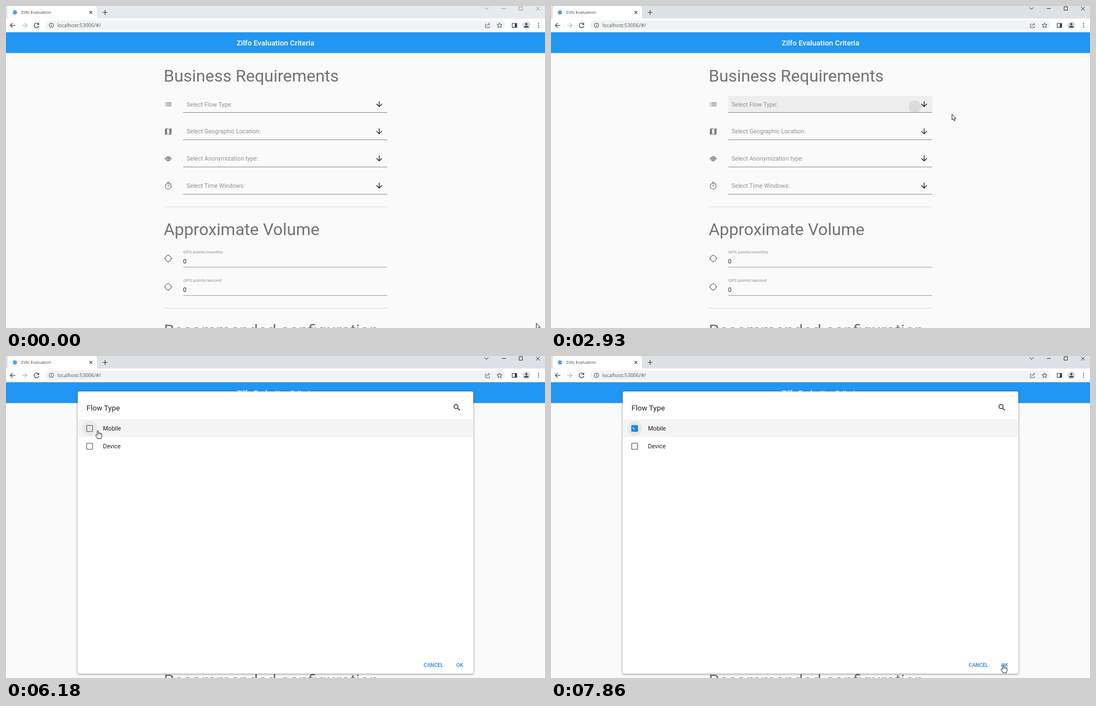
Write an HTML page that moves like this. It is 967x579 px and loops after 7.99 s.

```html
<!DOCTYPE html>
<html lang="en">
<head>
<meta charset="utf-8">
<title>Zilfo Evaluation</title>
<style>
  html, body { margin: 0; width: 100%; height: 100%; overflow: hidden; background: #fafafa; }
  svg { display: block; }
  text { font-family: Roboto, sans-serif; white-space: pre; }
  .ui { font-family: "Open Sans", "Noto Sans", sans-serif; }
  #dialog > .sheet { filter: drop-shadow(0 1px 2px rgba(0, 0, 0, .42)); }
</style>
</head>
<body>
<svg id="stage" width="967" height="579" viewBox="0 0 967 579"></svg>
<script>
const LOOP = 7990;

const ICONS = {
  down: '<path d="M20 12l-1.41-1.41L13 16.17V4h-2v12.17l-5.58-5.59L4 12l8 8 8-8z"/>',
  list: '<path d="M3 13h2v-2H3zm0 4h2v-2H3zm0-8h2V7H3zm4 4h14v-2H7zm0 4h14v-2H7zM7 7v2h14V7z"/>',
  map: '<path d="M20.5 3l-.16.03L15 5.1 9 3 3.36 4.9c-.21.07-.36.25-.36.48V20.5c0 .28.22.5.5.5l.16-.03L9 18.9l6 2.1 5.64-1.9c.21-.07.36-.25.36-.48V3.5c0-.28-.22-.5-.5-.5zM15 19l-6-2.11V5l6 2.11z"/>',
  mask: '<path d="M1.5 11h4v2h-4zm17 0h4v2h-4z"/><circle cx="12" cy="12" r="7"/><path d="M8.6 15.5v-5h1v-1a2.4 2.4 0 0 1 4.8 0v1h1v5z" fill="none" stroke="#fafafa" stroke-width="1.2"/>',
  timer: '<path d="M9 1h6v2H9zm2 7h2v6h-2zm6.6-1.9l1.5-1.5 1.4 1.4-1.5 1.5z"/><circle cx="12" cy="13" r="8" fill="none" stroke="currentColor" stroke-width="2"/>',
  target: '<path d="M11 1h2v3h-2zm0 19h2v3h-2zM1 11h3v2H1zm19 0h3v2h-3z"/><circle cx="12" cy="12" r="8" fill="none" stroke="currentColor" stroke-width="2"/>',
  search: '<path d="M15.5 14h-.79l-.28-.27A6.47 6.47 0 0 0 16 9.5 6.5 6.5 0 1 0 9.5 16c1.61 0 3.09-.59 4.23-1.57l.27.28v.79l5 4.99L20.49 19zm-6 0a4.5 4.5 0 1 1 0-9 4.5 4.5 0 0 1 0 9z"/>'
};

const icon = (name, cx, cy, color) =>
  `<g transform="translate(${cx - 8} ${cy - 8}) scale(.6667)" fill="${color}" color="${color}">${ICONS[name]}</g>`;
const text = (x, y, size, color, str, extra = '') =>
  `<text x="${x}" y="${y}" font-size="${size}" fill="${color}" ${extra}>${str}</text>`;
const rect = (x, y, w, h, fill, extra = '') =>
  `<rect x="${x}" y="${y}" width="${w}" height="${h}" fill="${fill}" ${extra}/>`;
const line = (d, color, width = 1.2, extra = '') =>
  `<path d="${d}" fill="none" stroke="${color}" stroke-width="${width}" ${extra}/>`;

const GREY = '#737373', HINT = '#929292', INK = '#212121', BLUE = '#2196f3', LINK = '#1e88e5', DARK = '#4a4d51';

function browser() {
  return rect(0, 0, 967, 24, '#dee1e6', 'id="strip"') +
    '<path d="M0 23Q3 23 3 19V5Q3 0 8 0H158Q163 0 163 5V19Q163 23 167 23Z" fill="#fff"/>' +
    rect(0, 22.5, 967, 24.7, '#fff') +
    '<circle cx="16" cy="11.5" r="3.8" fill="#42a5f5"/>' +
    text(27, 14.2, 7.6, '#45494d', 'Zilfo Evaluation', 'class="ui"') +
    line('M149.8 9L154.6 13.8M154.6 9L149.8 13.8', '#3c4043', 1.1) +
    line('M173.5 11.5H182M177.7 7.3V15.7', '#3c4043', 1.2) +
    '<g id="buttons">' +
      line('M858.5 2.5L862 6L865.5 2.5', 'currentColor', 1) +
      line('M889.5 4.5H896.5', 'currentColor', 1) +
      line('M920.5 1.5H926.5V7.5H920.5Z', 'currentColor', 1) +
      line('M951 1.5L957.5 8M957.5 1.5L951 8', 'currentColor', 1) +
    '</g>' +
    line('M16.5 34.8H8M12 30.6L7.8 34.8L12 39', DARK, 1.3) +
    line('M29 34.8H37.5M33.5 30.6L37.7 34.8L33.5 39', '#b4b7ba', 1.2) +
    line('M58.3 32.3A4.3 4.3 0 1 0 59 36', DARK, 1.3) +
    '<path d="M59.4 29.8V34H55.2Z" fill="#4a4d51"/>' +
    rect(70.5, 26, 825, 17.5, '#f1f3f4', 'rx="8.75"') +
    `<circle cx="81.5" cy="34.8" r="4" fill="none" stroke="${DARK}"/>` +
    line('M81.5 34.2V37M81.5 32.3V33.3', DARK, 1.1) +
    text(92, 38, 9, '#55595d', 'localhost:53006/#/', 'class="ui"') +
    line('M862 32.5H860V39H867.5V36.5M862.5 36.5Q863 32.8 867 32.6M865.3 30.2L868 32.6L865.3 35', '#5f6368', 1) +
    '<path d="M885.5 30.2L886.8 33.4L890.1 33.6L887.6 35.8L888.4 39L885.5 37.2L882.6 39L883.4 35.8L880.9 33.6L884.2 33.4Z" fill="none" stroke="#4a4d51"/>' +
    line('M908.2 31.2H916.2V38.4H908.2Z', '#3c4043', 1.1) + rect(912.8, 31, 3.6, 7.6, '#3c4043') +
    '<circle cx="933.5" cy="34.8" r="7" fill="#d8dbe0"/><circle cx="933.5" cy="32.6" r="2" fill="#45494e"/>' +
    '<path d="M929.3 38.8Q929.3 35.6 933.5 35.6T937.7 38.8Z" fill="#45494e"/>' +
    [31.3, 34.8, 38.3].map(y => `<circle cx="955.5" cy="${y}" r="1" fill="#4a4d51"/>`).join('') +
    rect(0, 47.2, 967, 37.4, BLUE) +
    text(483.5, 71.4, 13.33, '#fff', 'Zilfo Evaluation Criteria', 'text-anchor="middle" font-weight="500"');
}

function form() {
  const picks = [['list', 'Flow Type'], ['map', 'Geographic Location'], ['mask', 'Anonymization type'], ['timer', 'Time Windows']];
  const counts = ['monthly', 'second'];
  const heading = (y, str) => text(283, y, 30, GREY, str);
  return heading(135.8, 'Business Requirements') +
    '<g id="hover">' + rect(318, 161.5, 366, 30, '#eee', 'rx="2"') + '</g>' +
    '<circle id="ripple" cx="652.8" cy="181" fill="#000" fill-opacity=".075"/>' +
    picks.map(([name, label], i) => {
      const y = 176.5 + i * 48.85;
      return icon(name, 291, y + .4, '#808080') +
        text(324, y + 4, 10.67, HINT, `Select ${label}:`) +
        icon('down', 669.5, y, '#222') +
        rect(318, Math.round(y + 14.5), 366, 1, '#8c8c8c');
    }).join('') +
    rect(283, 360.6, 401, 1, '#dfdfdf') +
    heading(412.3, 'Approximate Volume') +
    counts.map((unit, i) => {
      const y = 445 + i * 51;
      return icon('target', 291, y + 9, '#808080') +
        text(318, y - .2, 8, HINT, `GPS points/${unit}`) +
        text(317.7, y + 18, 10.67, INK, '0') +
        rect(318, y + 24, 366, 1, '#a2a2a2');
    }).join('') +
    rect(283, 543, 401, 1, '#dfdfdf') +
    heading(593.7, 'Recommended configuration');
}

function dialog() {
  const box = (y, id) => `<rect ${id} x="144.7" y="${y}" width="10.7" height="10.7" rx=".7" fill="none" stroke="#707070" stroke-width="1.33"/>`;
  return '<g id="dialog">' +
    rect(128.7, 63.7, 709.6, 507.3, '#fff', 'rx="2.7" class="sheet"') +
    text(144.6, 98, 13.33, INK, 'Flow Type') +
    icon('search', 809, 92.6, '#222') +
    rect(128.7, 114, 709.6, 32, '#f4f4f4', 'id="row"') +
    '<circle id="halo" cx="150" cy="130.2" r="13.3" fill="#000" fill-opacity=".045"/>' +
    box(124.9, 'id="check"') +
    line('M146.6 128.4L149.6 131.8', '#fff', 1.3, 'id="tick"') +
    text(174, 134.2, 10.67, INK, 'Mobile') +
    box(156.9, '') +
    text(174, 166.2, 10.67, INK, 'Device') +
    text(749.3, 559.4, 9.33, LINK, 'CANCEL', 'font-weight="500"') +
    text(807.7, 559.4, 9.33, LINK, 'OK', 'font-weight="500"') +
    '</g>';
}

const cursor = `<g id="cursor" stroke="#111" stroke-width=".9" stroke-linejoin="round" fill="#fff">
  <path id="arrow" d="M.4.4V10.9L2.7 8.8L4.3 12.5L6 11.8L4.4 8.1H7.6Z"/>
  <g id="hand">
    <path d="M-1.2 1.2C-1.2-.2 1.1-.2 1.1 1.2V5C1.3 4 3.1 4.1 3.2 5.3C3.5 4.4 5.1 4.7 5.2 5.9C5.5 5.2 7 5.4 7 6.8V9.8C7 12 5.8 12.6 5.8 14.7H-.8C-.8 12.8-4.3 9.6-4.3 8.4C-4.1 7.2-2.6 7.4-1.2 9Z"/>
    <path d="M1.1 5V7.6M3.2 5.3V7.8M5.2 5.9V8" fill="none" stroke-width=".6"/>
  </g></g>`;

document.getElementById('stage').innerHTML = rect(0, 0, 967, 579, '#fafafa') + form() + browser() + dialog() + cursor;
const el = id => document.getElementById(id);
const show = (id, on) => el(id).style.display = on ? '' : 'none';

// Pointer moves: first step, last step, step count, destination x and y
const START = [951, 570];
const MOVES = [
  [70, 670, 10, 653, 178],
  [1010, 1010, 1, 654, 181.3],
  [2000, 2340, 5, 719, 194],
  [5590, 5590, 1, 623, 188],
  [5660, 5980, 6, 168.5, 135],
  [6180, 6380, 4, 151, 129.8],
  [6780, 6980, 4, 183.3, 153.7],
  [7120, 7720, 10, 811.3, 555]
];
const ease = p => p * p * (3 - 2 * p) * .5 + p * .5;

function pointer(t) {
  let [x, y] = START;
  for (const [from, to, n, tx, ty] of MOVES) {
    if (t < from) break;
    const gap = n > 1 ? (to - from) / (n - 1) : 1;
    const step = Math.min(n, Math.floor((t - from) / gap + 1.001));
    const p = ease(step / n);
    x += (tx - x) * p;
    y += (ty - y) * p;
  }
  return [x, y];
}

function overLink(x, y, open) {
  if (open) return (x > 129 && x < 838 && y > 114 && y < 178) || (x > 800 && y > 545 && y < 568);
  return x > 318 && x < 684 && y > 162 && y < 191;
}

function draw(t) {
  const open = t >= 4060, active = t >= 880, checked = t >= 7860;
  const [x, y] = pointer(t);
  const hand = overLink(x, y, open);
  el('cursor').setAttribute('transform', `translate(${x.toFixed(1)} ${y.toFixed(1)})`);
  show('hand', hand);
  show('arrow', !hand);

  el('strip').setAttribute('fill', active ? '#dee1e6' : '#e7eaed');
  el('buttons').style.color = active ? '#333' : '#999';
  show('hover', active);
  show('ripple', t >= 1940);
  el('ripple').setAttribute('r', t < 2930 ? 5.4 : 11.2);

  show('dialog', open);
  show('row', t >= 5980);
  show('halo', t >= 6180);
  show('tick', checked);
  const check = el('check');
  check.setAttribute('fill', checked ? LINK : 'none');
  check.setAttribute('stroke', checked ? LINK : t >= 6640 ? '#5f6b78' : '#707070');
}

const begin = performance.now();
function frame() {
  draw((performance.now() - begin) % LOOP);
  requestAnimationFrame(frame);
}
frame();
</script>
</body>
</html>
```
